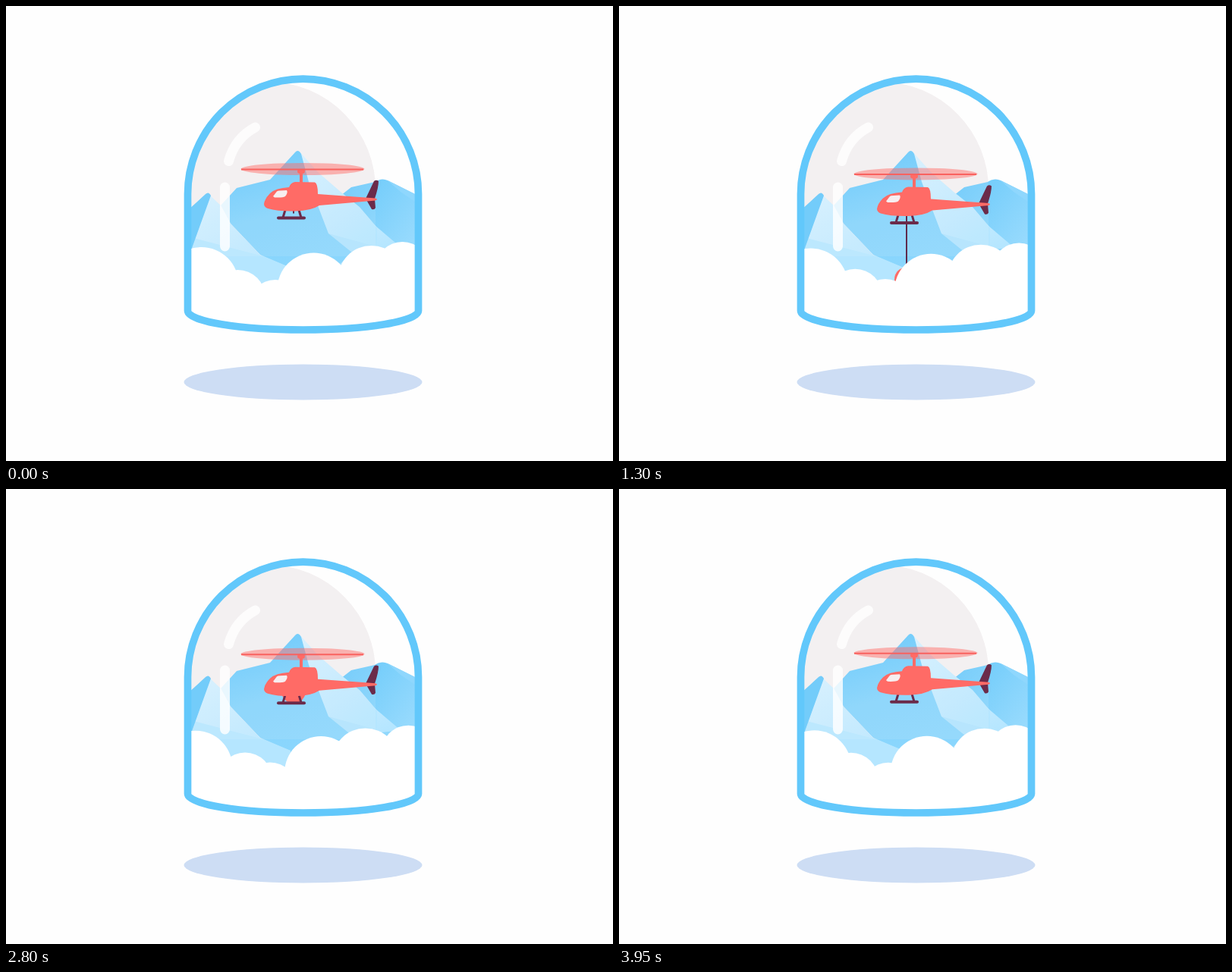
Write an HTML page that moves like this. It is 800x600 px and loops after 4000 ms.

```html
<!DOCTYPE html>
<html lang="en">
<head>
<meta charset="utf-8">
<title>Helicopter in a glass dome</title>
<style>
  html, body { margin: 0; width: 100%; height: 100%; overflow: hidden; background: #fefefe; }
  svg { display: block; width: 800px; height: 600px; }
</style>
</head>
<body>
<svg viewBox="0 0 800 600">
  <defs>
    <path id="glass" d="M239.5 248A152 152 0 0 1 543.5 248V402C543.5 416 475 427 391.500 427S239.5 416 239.5 402Z"/>
    <path id="tint" d="M200 100H345A142 142 0 0 1 487 245V330H200Z" fill="#f3eff0"/>
    <clipPath id="inside"><use href="#glass"/></clipPath>
    <linearGradient id="deep" x1="0" y1="0" x2=".3" y2="1">
      <stop offset="0" stop-color="#5dc5fa"/><stop offset=".6" stop-color="#84d3fc"/><stop offset="1" stop-color="#8ad6fd"/>
    </linearGradient>
    <linearGradient id="pale" x1="0" y1="0" x2=".5" y2="1">
      <stop offset="0" stop-color="#d6f0ff"/><stop offset="1" stop-color="#b5e6ff"/>
    </linearGradient>
    <linearGradient id="side" x1="0" y1="0" x2="1" y2=".8">
      <stop offset="0" stop-color="#66c8fa"/><stop offset="1" stop-color="#9adbfd"/>
    </linearGradient>
  </defs>

  <ellipse cx="391.5" cy="496" rx="157" ry="23.5" fill="#cdddf4"/>

  <g clip-path="url(#inside)">
    <use href="#tint"/>

    <!-- right mountain -->
    <path fill="url(#side)" d="M441 250L455 239L486 232Q495 226 503 230L545 251V330H460Z"/>
    <path fill="#8fd7fd" d="M503 230L545 251V262L520 245Z"/>
    <path fill="url(#pale)" d="M447 250L480 284L520 318L420 330V250Z"/>

    <!-- middle mountain -->
    <path fill="url(#pale)" d="M386 191L411 219L441 245L466 265L489 292V340H400Z"/>
    <path fill="#b0e3fe" d="M425 300L487 317V345H400Z"/>
    <path fill="url(#deep)" d="M283 263L304 240L348 229L381 193Q385 188 389 195L399 232L425 300L456 325L430 350H372L335 328L296 287Z"/>

    <!-- left mountain -->
    <path fill="url(#pale)" d="M266 247L283 263L296 287L335 328L375 345V380H240V318Z"/>
    <path fill="#b5e6ff" d="M240 304L335 329L375 345V380H240Z"/>
    <path fill="#64c7fa" d="M240 269L263 248Q267 244 270 250L244 322H240Z"/>

    <use href="#tint" opacity=".1"/>
    <path d="M288.5 239V317M293.5 204.5Q302 174 328.5 160" fill="none" stroke="#fff"
      stroke-opacity=".82" stroke-width="13" stroke-linecap="round"/>

    <g id="heli">
      <path id="rope" stroke="#5f2b4b" stroke-width="2"/>
      <circle id="ball" cx="379" r="16" fill="#ff6b66"/>
      <path d="M368 54L365 64M386 54L389 64" stroke="#6b2b4a" stroke-width="3"/>
      <path d="M359 64.5H393" stroke="#6b2b4a" stroke-width="4" stroke-linecap="round"/>
      <path fill="#6b2b4a" d="M474 39L485 16Q488 13.500 491 16Q491 24 486 39L487 51Q486 54 482 53Z"/>
      <path fill="#ff6b66" d="M340 46Q341 39 348 32Q355 25 373 24Q375 18 381 17L407 17.500Q411 19 411 33L487 38.500Q491 40 487 41.500L413 48Q402 55 382 55.500Q358 56 345 52Q340 50 340 46Z"/>
      <path fill="#f7eef0" d="M352 36L357 29.500Q359 28 370 28Q372 31 368 36Q365 38 354 37.500Z"/>
      <path d="M389 2V19" stroke="#ff6b66" stroke-width="4"/>
      <rect x="384" y="0" width="10" height="6" rx="3" fill="#ff6b66"/>
      <ellipse cx="391" cy="0" rx="81.500" ry="8" fill="#ff6b66" opacity=".48"/>
      <path d="M310 .5H471" stroke="#f9625f" stroke-width="2"/>
    </g>

    <g id="clouds" fill="#fff"><rect x="235" y="368" width="315" height="65"/></g>
  </g>

  <use href="#glass" fill="none" stroke="#62c8fb" stroke-width="9.700"/>
</svg>

<script>
const LOOP = 4000, REST = 215, DEEPEST = 21;
const PICKUP = 1250, STOWED = 2980, ROPE = 126;
const $ = id => document.getElementById(id);

// The helicopter sinks and rises again in three dips
const dips = [
  { from: 0, to: 1600, depth: DEEPEST },
  { from: 1600, to: 3050, depth: 10 },
  { from: 3050, to: 4070, depth: 10 }
];

const puffs = [
  { r: 49, x: 253, top: 318, swing: 5, push: 5 },
  { r: 36, x: 311, top: 348, swing: -6, push: -4 },
  { r: 36, x: 351, top: 361, swing: 4.5, push: -3 },
  { r: 48, x: 411, top: 325.5, swing: -6, push: 4 },
  { r: 44, x: 477, top: 316, swing: 5, push: -4 },
  { r: 36, x: 527, top: 311, swing: -5, push: 5 }
];
for (const p of puffs) {
  p.node = document.createElementNS("http://www.w3.org/2000/svg", "circle");
  p.node.setAttribute("r", p.r);
  $("clouds").append(p.node);
}

function sink(t) {
  const { from, to, depth } = dips.find(d => t < d.to);
  return depth * Math.sin(Math.PI * (t - from) / (to - from)) ** 2;
}

function draw(t) {
  const low = sink(t);
  $("heli").setAttribute("transform", `translate(0 ${REST + low})`);

  // The winch pays out until the pickup, then reels in a little faster
  const speed = t < PICKUP ? .054 : .06;
  const end = ROPE - speed * Math.abs(t - PICKUP);
  $("rope").setAttribute("d", `M379 40V${Math.max(40, end)}`);
  $("ball").setAttribute("cy", end + 16);
  $("ball").setAttribute("visibility", t >= PICKUP && t < STOWED ? "visible" : "hidden");

  // Clouds sway once per loop; the rotor wind moves them as it comes near
  const sway = Math.cos(2 * Math.PI * t / LOOP - .44);
  for (const { node, r, x, top, swing, push } of puffs) {
    node.setAttribute("cx", x + swing * sway);
    node.setAttribute("cy", top + push * low / DEEPEST + r);
  }
}

const start = performance.now();
function tick() {
  draw((performance.now() - start) % LOOP);
  requestAnimationFrame(tick);
}
tick();
</script>
</body>
</html>
```
